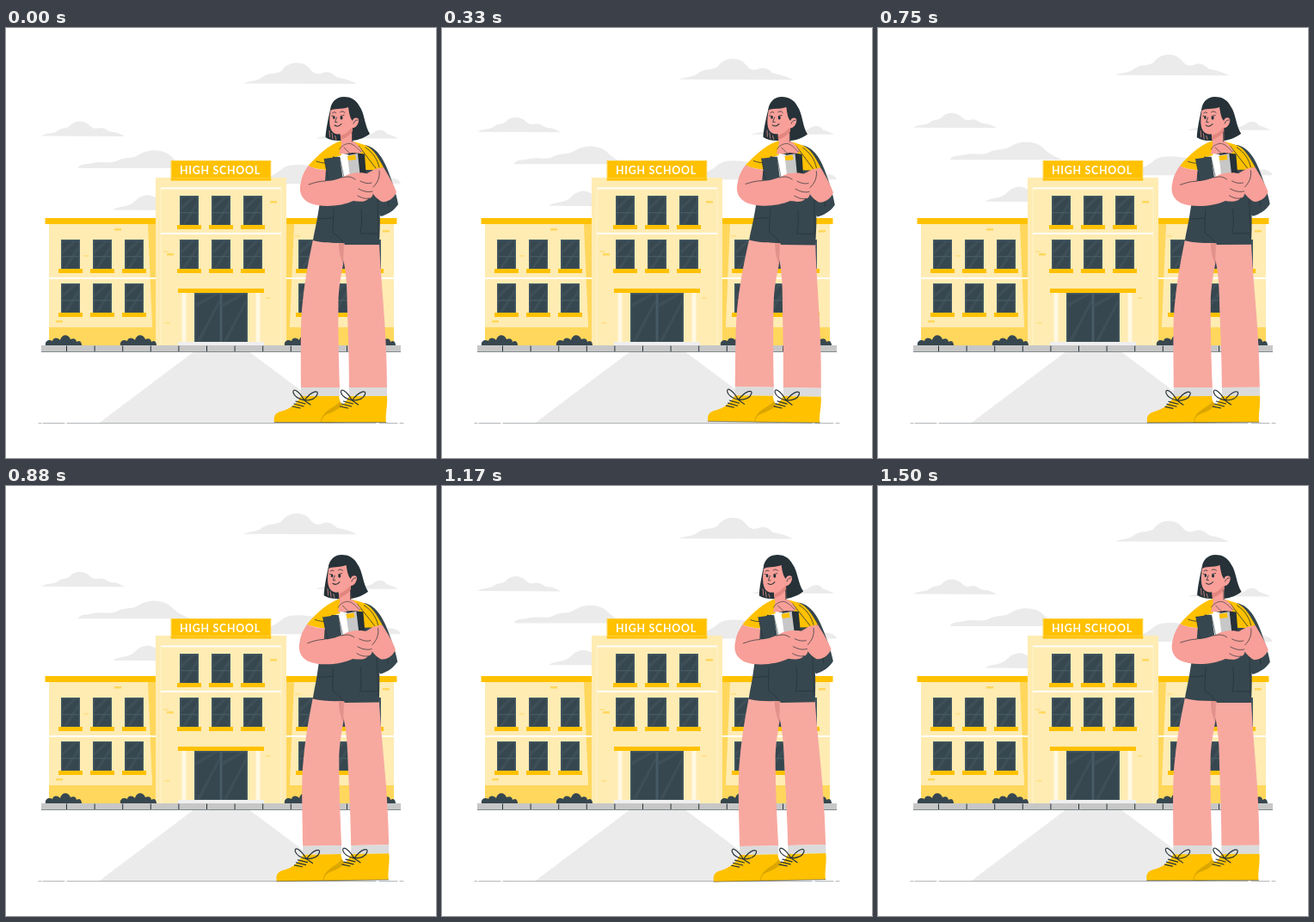
Recreate the animation shown at these times as an HTML page. Size 500x500 px, loop 1.54 s.

```html
<!DOCTYPE html>
<html lang="en">
<head>
<meta charset="utf-8">
<title>High school</title>
<style>
  html, body { margin: 0; width: 100%; height: 100%; overflow: hidden; background: #fff; }
  svg { display: block; width: 100vw; height: 100vh; }
  .line { fill: none; stroke: #263238; stroke-width: .8; stroke-linecap: round; stroke-linejoin: round; }
  .sign { font: 700 12.4px Lato, sans-serif; letter-spacing: .75px; fill: #fff; }
</style>
</head>
<body>
<svg viewBox="0 0 500 500">
  <g id="clouds" fill="#ebebeb">
    <path d="M276 64.5C283 61 291 63 298 57C306 51 317 55 322 48C328 39 345 38 352 46C357 52 359 54 366 53C374 49 380 52 384 57C392 59 399 60 408 65Z"/>
    <path d="M41 125.5C48 121 55 124 61 119C66 115 71 118 75 113C80 107 91 107 97 113C101 118 106 117 111 116C117 117 119 121 124 121C129 121 133 123 138 126Z"/>
    <path d="M84 163C86 157 94 159 101 157C113 154 120 159 130 154C139 149 147 153 155 147C166 140 184 140 194 151C200 157 206 159 214 163Z"/>
    <path d="M124 211.5C132 207 138 208 145 205C151 202 152 197 160 195C168 192 174 198 182 201L188 212Z"/>
    <path d="M360 128.5C368 125 376 127 384 122C394 116 404 122 411 125C419 125 424 125 428 121C434 117 439 118 443 123C448 125 452 126 456 128.5Z"/>
    <path d="M298 181C306 171 315 170 322 163C333 156 350 160 362 161C386 162 412 164 428 174C438 175 455 171 459 181Z"/>
  </g>

  <path d="M219 376H282L394 459.500H108Z" fill="#ebebeb"/>
  <path d="M38 459.500H41M43 459.500H68M71 459.500H430M434 459.500H455M458 459.500H462" class="line" style="stroke-width:.35"/>

  <g id="school"></g>

  <g id="girl">
    <!-- backpack -->
    <path d="M413 136C427 135 437 148 443 163C449 178 454 193 456 205C451 213 443 217 436 219L424 207Z" fill="#37474f"/>
    <path d="M421 141C434 151 442 174 445 207" class="line"/>

    <!-- trousers -->
    <path d="M357 246L394 248C395 274 387 288 386.500 320C386 350 387 390 388 418H343C343 378 342 342 345 318C348 290 352 270 357 246Z" fill="#f7a9a0"/>
    <path d="M387 249H434C436 300 443 350 443 418H399C399 376 397 340 396.500 310C396 286 393 268 387 249Z" fill="#f7a9a0"/>
    <path d="M387 250H393L392 275C389 268 387 260 387 250Z" fill="#e2928a"/>
    <path d="M343 418H388V428H343ZM399 418H443V428H399Z" fill="#dbdbdb"/>

    <!-- shoes -->
    <path d="M343 428H387C388 434 390 439 394 441L378 458.500H312C311 451 313 448 319 446C331 443 338 437 343 428Z" fill="#ffc100"/>
    <path d="M388 434C383 442 367 444 366 458.500H382L396 439C392 439 390 437 388 434Z" fill="#dba600"/>
    <path d="M399 428H443C444 439 441 448 442 458.500H367C367 453 370 450 376 448C387 444 394 438 399 428Z" fill="#ffc100"/>
    <path d="M312 458.500H442" class="line" style="stroke-width:.5"/>
    <g class="line" style="stroke-width:1.200">
      <path id="lace" d="M347 433C340 421 333 418 334 424C336 430 343 432 347 433C356 421 364 421 362 426C360 432 352 433 347 433L354 438M337 434L348 437M335 437L346 440M333 440L342 442"/>
      <use href="#lace" x="55.500"/>
    </g>

    <!-- torso -->
    <path d="M371 166L362 221C360 232 358 240 357 247C368 250 380 250 393 250L394 252H434C435 230 436 212 432 191L429 163Z" fill="#37474f"/>
    <path d="M381 211C381 225 379 236 381 239C387 242 389 245 392 250M413 211C414 220 414 230 412 239L432 239M432 199L433 244M363 222L380 221" class="line" style="stroke-width:.7"/>

    <!-- shirt -->
    <path d="M390 131C377 135 364 146 351.500 160C357 163 363 164 372 165H429L439 162C432 149 426 138 414 135L404 132Z" fill="#ffc100"/>
    <path d="M361 155C370 158 374 158 379 153M410 137L430 163M418 139C427 145 432 153 434 162" class="line"/>

    <!-- hair behind and neck -->
    <path d="M393 80C383 80 378 87 377 95C374 108 372 119 371.500 127C376 130 381 131 388 131L403 131C411 130 418 127 423 123C417 114 417 99 411 91C407 83 400 80 393 80Z" fill="#263238"/>
    <path d="M388 119L403 111L403 131C408 134 411 138 414 143L409 148H387L390 135Z" fill="#f79f98"/>
    <path d="M389 125C394 124 399 120 403 115V121C398 126 393 129 389 130Z" fill="#e2877f"/>
    <path d="M388 141C390 136 398 133 402 135C408 138 410 142 413 144M393 139L400 146" class="line" style="stroke-width:.6"/>
    <path d="M402.500 121V132" class="line"/>

    <!-- face -->
    <path d="M378 93C376 104 375 114 379 120C384 126 392 124 401 116C407 118 411 110 410 106C408 103 404 105 402 106L401 91L388 88Z" fill="#f79f98"/>
    <path d="M377 96C382 93 390 95 398 92C399 99 400 105 403 108C404 104 408 102 411 106L412 94C405 78 381 79 377 96Z" fill="#263238"/>
    <path d="M376 119L376.500 127M379 122L380 129M382.500 125L384 130" fill="none" stroke="#f79f98" stroke-width=".7"/>
    <path d="M404 111C405 108 407 107 409 107M379.500 99C381 97.500 382 97.500 383.500 98.500M388.500 98C390 96.500 392 96.500 394 98.500M384.500 104L382.500 109.500H385" class="line"/>
    <path d="M382 113C385 115 388 114 390 111.500" class="line" style="stroke-width:1"/>
    <ellipse cx="381.300" cy="104" rx="1.300" ry="2" fill="#263238"/>
    <ellipse cx="390" cy="104.500" rx="1.500" ry="2.100" fill="#263238"/>
    <path d="M389 102.500L393 101.500M380 102.500L378.500 102" class="line"/>

    <!-- books -->
    <path d="M380 149L403 145L417 146.500L419 174L384 184Z" fill="#263238"/>
    <path d="M370 152L388 149.500L393 174L375 181Z" fill="#37474f"/>
    <path d="M380 149L391 146L398 147L401 176L392 177L388 150Z" fill="#fff"/>
    <path d="M397 148L409 146L412 174H400Z" fill="#c7c7c7"/>
    <path d="M379 149L390 146L390 148L383 150ZM397 149L406 147.500L407 153L398 154Z" fill="#ffc100"/>
    <path d="M370 152L375 178M388 150L393 174M410 146L413 171" class="line" style="stroke-width:.6"/>

    <!-- arms -->
    <path d="M429 164L439 162C445 172 451 182 454 191C451 198 444 203 437 202C430 198 427 193 423 188L420 169Z" fill="#f79f98"/>
    <path d="M351.500 160C357 163 364 165 372 165L371 178C381 178 387 175 393 173C400 168 413 167 423 170C428 173 427 178 425 180C429 183 428 188 426 190C428 194 425 198 422 198C418 203 410 202 404 201C389 208 365 209 352 203C343 198 340 190 343 179C344 172 348 165 351.500 160Z" fill="#f79f98"/>
    <path d="M371 178C364 178 358 180 352 182M391 174C398 172 402 173 406 176M412 178C418 181 422 181 425 180M410 187C417 191 422 191 426 190M409 195C414 198 419 199 422 198M434 166C435 174 432 180 427 185" class="line" style="stroke-width:.7"/>
  </g>
</svg>
<script>
const YELLOW = '#ffc100', WALL = '#ffecb3', SHADE = '#ffd75c', PALE = '#fff3d0';
const DARK = '#37474f', FRAME = '#455a64', INK = '#263238';
const school = document.getElementById('school');
const parts = [];
const rect = (x, y, w, h, fill) => parts.push(`<rect x="${x}" y="${y}" width="${w}" height="${h}" fill="${fill}"/>`);
const path = (d, fill) => parts.push(`<path d="${d}" fill="${fill}"/>`);

function pane(x, y, w, h) {
  rect(x, y, w, h, FRAME);
  rect(x + 1.5, y + 1.5, w - 3, h - 3, DARK);
  path(`M${x + w - 9} ${y + 2}h5L${x + 2} ${y + 17}v-5ZM${x + w - 2} ${y + 7}v6L${x + 7} ${y + h - 2}h-4Z`, '#3e4f57');
}

function windowAt(x, y) {
  pane(x, y, 22, 35);
  rect(x + 1, y + 19, 20, 1.3, FRAME);
  rect(x - 3, y + 34, 28, 5, YELLOW);
}

function wing(x, roofX, shadow, cols) {
  rect(x, 228, 125, 141, WALL);
  rect(x, 348, 125, 21, SHADE);
  path(shadow, SHADE);
  rect(x, 290, 125, 2, '#fff');
  rect(roofX, 221, 130, 7, YELLOW);
  for (const c of cols) for (const y of [246, 297]) windowAt(c, y);
}

function bush(x) {
  path(`M${x} 369C${x - 1} 363 ${x + 5} 362 ${x + 8} 364C${x + 9} 359 ${x + 15} 360 ${x + 17} 363
    C${x + 19} 355 ${x + 27} 356 ${x + 29} 362C${x + 34} 360 ${x + 36} 363 ${x + 36} 365C${x + 41} 362 ${x + 42} 367 ${x + 42} 369Z`, DARK);
}

function build() {
  wing(50, 45.5, 'M165 228H175V369H171Z', [64, 101, 138]);
  wing(326, 324.5, 'M326 228H335L329 369H326Z', [340, 377, 414]);

  // central block
  rect(174, 174, 152, 195, WALL);
  rect(179.5, 187, .8, 182, PALE);
  rect(319.7, 187, .8, 182, PALE);
  rect(180, 185.5, 140, 1.8, '#fff');
  rect(180, 238, 140, 2, '#fff');
  for (const x of [202, 239, 276]) for (const y of [195, 246]) windowAt(x, y);

  // entrance
  rect(204.5, 308, 5, 58, '#fff8e1');
  rect(290.5, 308, 5, 58, '#fff8e1');
  pane(219, 308, 31, 58);
  pane(250, 308, 31, 58);
  rect(200, 303, 100, 5, YELLOW);
  rect(200, 365, 100, 4.5, '#efefef');

  // loose bricks
  for (const [x, y] of [[126, 233], [307, 201], [187, 262], [58, 340], [438, 235]]) rect(x, y, 8, 2.5, SHADE);
  for (const [x, y] of [[90, 264], [302, 313], [185, 342], [336, 241], [183, 259]]) rect(x, y, 6, 1.8, '#ffe08a');

  // sign
  rect(191.7, 154, 116.5, 23.5, YELLOW);
  parts.push('<rect x="192.5" y="154.7" width="115" height="19.8" fill="none" stroke="#ffd65a" stroke-width=".7"/>');
  parts.push('<text class="sign" x="202" y="170.3">HIGH SCHOOL</text>');

  for (const x of [46, 133, 324, 411]) bush(x);

  // pavement
  rect(41, 369, 418, 7.5, '#c7c7c7');
  rect(41, 376, 418, .8, '#6b7579');
  for (let i = 0; i < 12; i++) rect(70 + i * 32.6, 369.5, 1, 6.5, INK);

  school.innerHTML = parts.join('');
}

const LOOP = 1540, LEAD = .2;
const clouds = document.getElementById('clouds');
const girl = document.getElementById('girl');

function draw(ms) {
  const a = (ms % LOOP) / LOOP * 2 * Math.PI + LEAD;
  const lift = 4.9 * (Math.cos(a) - Math.cos(LEAD));
  const sway = Math.sin(a) - Math.sin(LEAD);
  clouds.setAttribute('transform', `translate(0 ${lift.toFixed(3)})`);
  girl.setAttribute('transform', `rotate(${sway.toFixed(4)} 397 262)`);
}

build();
const start = performance.now();
function tick() {
  draw(performance.now() - start);
  requestAnimationFrame(tick);
}
tick();
</script>
</body>
</html>
```
